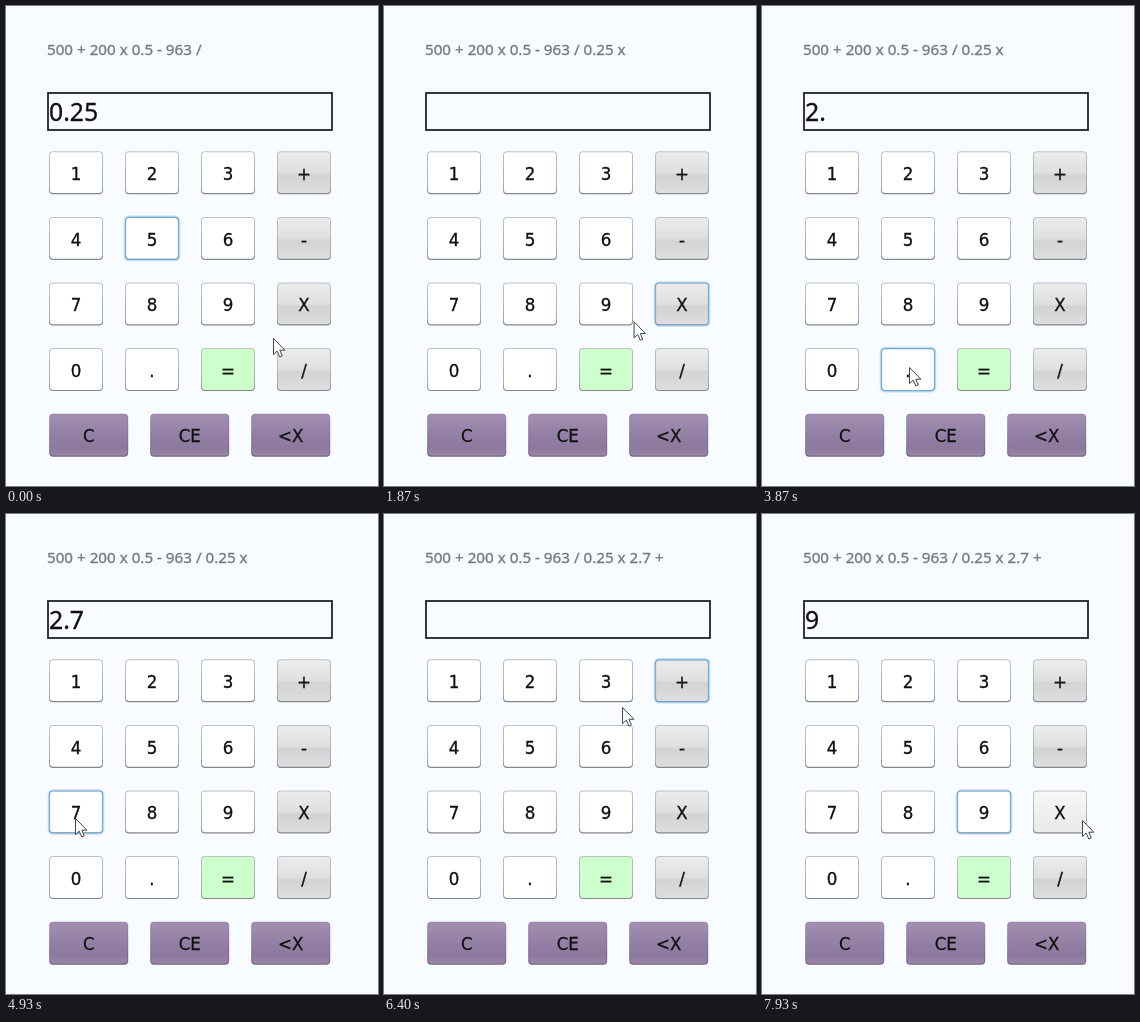
Recreate the animation shown at these times as an HTML page. Size 372 px wide and 480 px high, loop 8000 ms.

```html
<!DOCTYPE html>
<html lang="en">
<head>
<meta charset="utf-8">
<title>Calculator</title>
<style>
html, body { margin: 0; width: 100%; height: 100%; overflow: hidden; background: #f8fbff; }
svg { display: block; width: 372px; height: 480px; }
text { stroke: currentColor; stroke-width: .3; fill: currentColor; }
.key { font: condensed 18.5px "DejaVu Sans Condensed", "DejaVu Sans", sans-serif; text-anchor: middle; color: #101010; }
#expr { font: 15.2px "Noto Sans", "Open Sans", sans-serif; color: #74797e; }
#value { font: 24.8px "Noto Sans", "Open Sans", sans-serif; color: #101014; }
</style>
</head>
<body>
<svg viewBox="0 0 372 480">
  <defs>
    <linearGradient id="edge" x2="0" y2="1"><stop stop-color="#c0c1c4"/><stop offset=".85" stop-color="#a8a9ac"/><stop offset="1" stop-color="#828386"/></linearGradient>
    <linearGradient id="op" x2="0" y2="1"><stop stop-color="#ececec"/><stop offset=".5" stop-color="#dfdfdf"/><stop offset=".56" stop-color="#d3d3d3"/><stop offset="1" stop-color="#dedede"/></linearGradient>
    <linearGradient id="lit" x2="0" y2="1"><stop stop-color="#f7f7f8"/><stop offset="1" stop-color="#e9e9ea"/></linearGradient>
    <linearGradient id="purple" x2="0" y2="1"><stop stop-color="#a28fb1"/><stop offset=".6" stop-color="#917ca2"/><stop offset=".8" stop-color="#8d789e"/><stop offset="1" stop-color="#9a86a9"/></linearGradient>
    <linearGradient id="purpleEdge" x2="0" y2="1"><stop stop-color="#9a87a9"/><stop offset="1" stop-color="#756481"/></linearGradient>
  </defs>
  <text id="expr" x="41" y="49"></text>
  <rect x="42" y="87" width="284" height="37" fill="#f8fbff" stroke="#20222d" stroke-width="1.8"/>
  <text id="value" x="43" y="115"></text>
  <g id="keys"></g>
  <g id="ring" fill="none">
    <rect x="-.5" y="-.5" width="55" height="44" rx="4.5" stroke="#c3dff3" stroke-width="1.6"/>
    <rect x=".5" y=".5" width="53" height="42" rx="3.5" stroke="#7aa9cf" stroke-width="1.2"/>
  </g>
  <path id="cursor" d="M.5 .5V16.6L4.2 13.1L6.8 19L9.3 17.9L6.8 12.2H11.9Z" fill="#fff" stroke="#444449" stroke-linejoin="round"/>
</svg>
<script>
const LOOP = 8000, STEP = 1000 / 15, W = 54, H = 43;
const $ = id => document.getElementById(id);
const keys = {};

function add(tag, attrs) {
  const el = document.createElementNS("http://www.w3.org/2000/svg", tag);
  for (const name in attrs) el.setAttribute(name, attrs[name]);
  return $("keys").appendChild(el);
}

function addKey(label, x, y, width, fill, edge = "url(#edge)") {
  add("rect", { x, y, width, height: H, rx: 4, fill: edge });
  const face = add("rect", { x: x + 1, y: y + 1, width: width - 2, height: H - 2.2, rx: 3, fill });
  add("text", { class: "key", x: x + width / 2, y: y + 28.7 }).textContent = label;
  keys[label] = { x, y, face, isOp: fill === "url(#op)" };
}

["123+", "456-", "789X", "0.=/"].forEach((row, r) => [...row].forEach((label, c) => {
  const fill = c === 3 ? "url(#op)" : label === "=" ? "#ccffcc" : "#fff";
  addKey(label, 43 + 76 * c, 145.3 + 65.6 * r, W, fill);
}));
["C", "CE", "<X"].forEach((label, i) =>
  addKey(label, 43.2 + 101 * i, 407.7, 79, "url(#purple)", "url(#purpleEdge)"));

const presses = [["X", 1130], ["2", 2930], [".", 3800], ["7", 4530], ["+", 6060], ["9", 6930]];

// An operator moves the typed number into the expression
function calculator(t) {
  let expr = "500 + 200 x 0.5 - 963 /", value = "0.25", focus = "5";
  for (const [label, at] of presses) {
    if (at > t) break;
    focus = label;
    if (keys[label].isOp) {
      expr += ` ${value} ${label.toLowerCase()}`;
      value = "";
    } else value += label;
  }
  return { expr, value, focus };
}

// Pointer moves: start, end, destination, optional control point of the curve
const home = [267, 332];
const moves = [
  [0, 670, [320, 303]],
  [1600, 1940, [240, 317]],
  [2000, 2870, [157, 163]],
  [3070, 3700, [147, 361]],
  [3930, 4460, [69, 304]],
  [5080, 5800, [316, 167]],
  [6130, 6800, [226, 300], [171, 187]],
  [6990, 7930, [320, 306], [385, 380]]
];

function pointer(t) {
  let pos = home;
  for (const [start, end, to, bend] of moves) {
    if (t <= start) break;
    const from = pos, u = Math.min(1, (t - start) / (end - start)), s = u * u * (3 - 2 * u);
    pos = to.map((goal, i) => {
      const mid = bend ? bend[i] : (from[i] + goal) / 2;
      return (1 - s) ** 2 * from[i] + 2 * s * (1 - s) * mid + s * s * goal;
    });
  }
  return pos;
}

function draw(now) {
  const t = Math.floor((now % LOOP + 5) / STEP) * STEP % LOOP;
  const { expr, value, focus } = calculator(t + 5);
  const [x, y] = pointer(t);
  $("expr").textContent = expr;
  $("value").textContent = value;
  $("ring").setAttribute("transform", `translate(${keys[focus].x} ${keys[focus].y})`);
  $("cursor").setAttribute("transform", `translate(${x} ${y})`);
  for (const k of Object.values(keys)) if (k.isOp) {
    const over = x >= k.x && x < k.x + W && y >= k.y && y < k.y + H;
    k.face.setAttribute("fill", over ? "url(#lit)" : "url(#op)");
  }
}

const start = performance.now();
function tick() {
  draw(performance.now() - start);
  requestAnimationFrame(tick);
}
tick();
</script>
</body>
</html>
```
